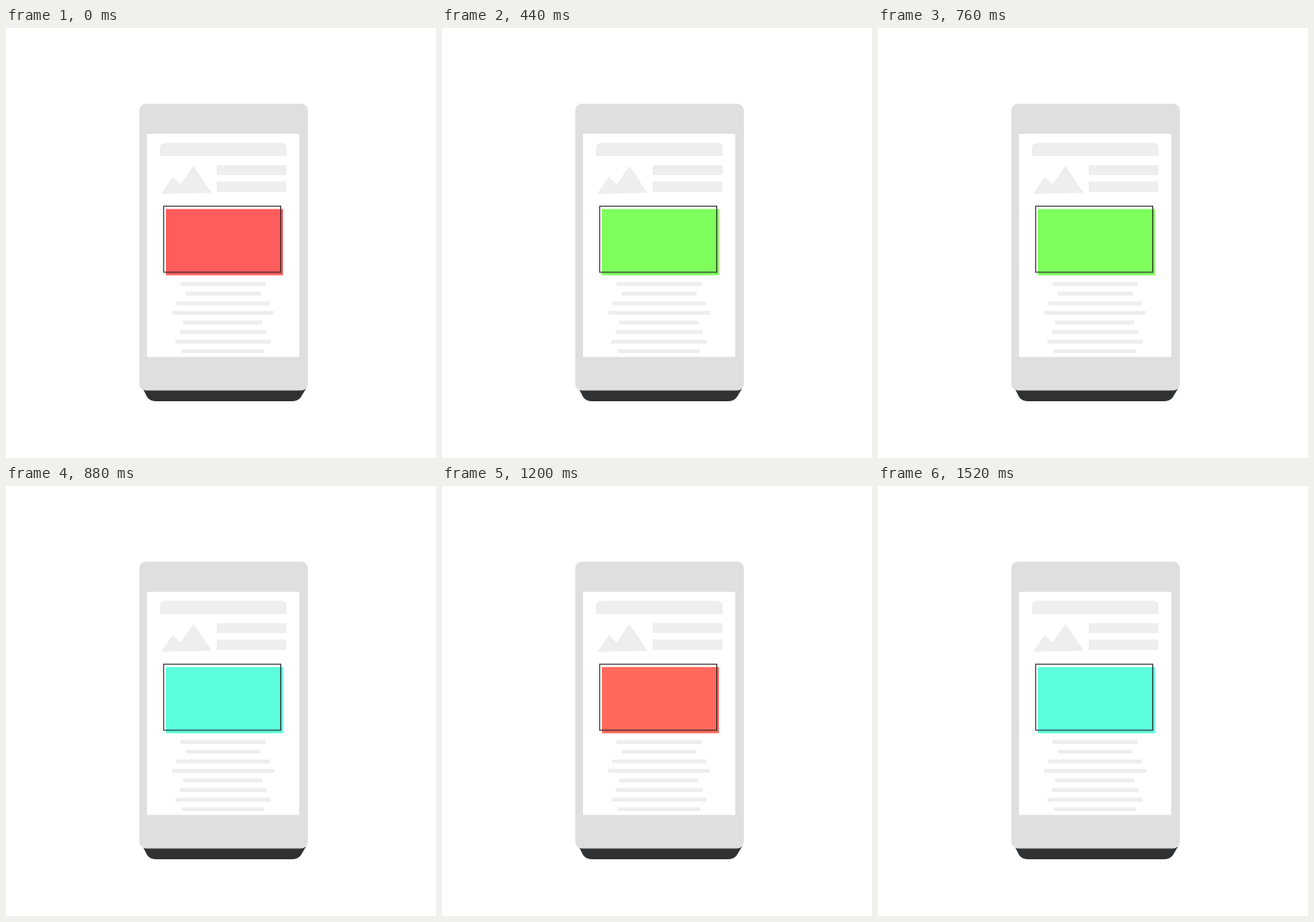
Animation of 500 by 500 pixels, one loop 1.84 s. Source, as an HTML page with a canvas:

```html
<!DOCTYPE html>
<html lang="en">
<head>
<meta charset="utf-8">
<title>Phone with colour-shifting banner</title>
<style>
  html, body { margin: 0; width: 100%; height: 100%; overflow: hidden; background: #fff; }
  canvas { display: block; width: 500px; height: 500px; }
</style>
</head>
<body>
<canvas id="stage" width="500" height="500"></canvas>
<script>
const ctx = document.getElementById('stage').getContext('2d');

const LOOP = 1840;
const TICK = 40;
const CYCLE = 16;      // ticks from red to mint and back
const PEAK_HUE = 167;
const TEXT_LINES = [
  [203, 302], [209, 296], [198, 307], [193.5, 311.5],
  [206, 298], [202, 303], [197, 308], [204.5, 300]
];

function box(x0, y0, x1, y1, color, radii = 0) {
  ctx.fillStyle = color;
  ctx.beginPath();
  ctx.roundRect(x0, y0, x1 - x0, y1 - y0, radii);
  ctx.fill();
}

function drawBase() {
  ctx.fillStyle = '#2f3132';
  ctx.beginPath();
  ctx.moveTo(159, 419);
  ctx.lineTo(164, 429);
  ctx.quadraticCurveTo(167, 434, 175, 434);
  ctx.lineTo(332, 434);
  ctx.quadraticCurveTo(340, 434, 343, 429);
  ctx.lineTo(349, 419);
  ctx.fill();
}

function drawMountains() {
  ctx.fillStyle = '#eee';
  ctx.beginPath();
  ctx.moveTo(180.5, 193);
  ctx.lineTo(194, 173);
  ctx.lineTo(203, 182);
  ctx.lineTo(218, 160.5);
  ctx.lineTo(239, 191.5);
  ctx.fill();
}

function drawPhone() {
  box(0, 0, 500, 500, '#fff');
  drawBase();
  box(155, 88, 351, 421.5, '#dfdfdf', 8);
  box(164, 123, 341, 382.5, '#fff');
  box(179, 133.5, 326.5, 149, '#eee', [6, 6, 0, 0]);
  drawMountains();
  box(245, 159.5, 326, 171, '#eee');
  box(245, 178.5, 326, 190.5, '#eee');
  TEXT_LINES.forEach(([x0, x1], i) => {
    const y = 295.6 + i * 11.14;
    box(x0, y, x1, y + 4.5, '#eee');
  });
}

// Eased hue that rests at both ends of each cycle.
function hueAt(tick) {
  if (tick < 2) return 0;
  const phase = Math.min(tick, 38) % CYCLE;
  const step = Math.max(0, Math.min(phase, 14 - phase, 6));
  const u = Math.min(1, (step + 0.67) / 6.2);
  return PEAK_HUE * (1 - Math.cos(Math.PI * u)) / 2;
}

function drawBanner(hue) {
  box(186, 210.5, 322, 287.5, `hsl(${hue}, 100%, 68%)`);
  ctx.strokeStyle = '#2a2a2a';
  ctx.lineWidth = 1.1;
  ctx.strokeRect(183.3, 207.2, 136.2, 76.8);
}

function frame() {
  const tick = Math.floor((performance.now() % LOOP) / TICK);
  drawPhone();
  drawBanner(hueAt(tick));
  requestAnimationFrame(frame);
}

frame();
</script>
</body>
</html>
```
